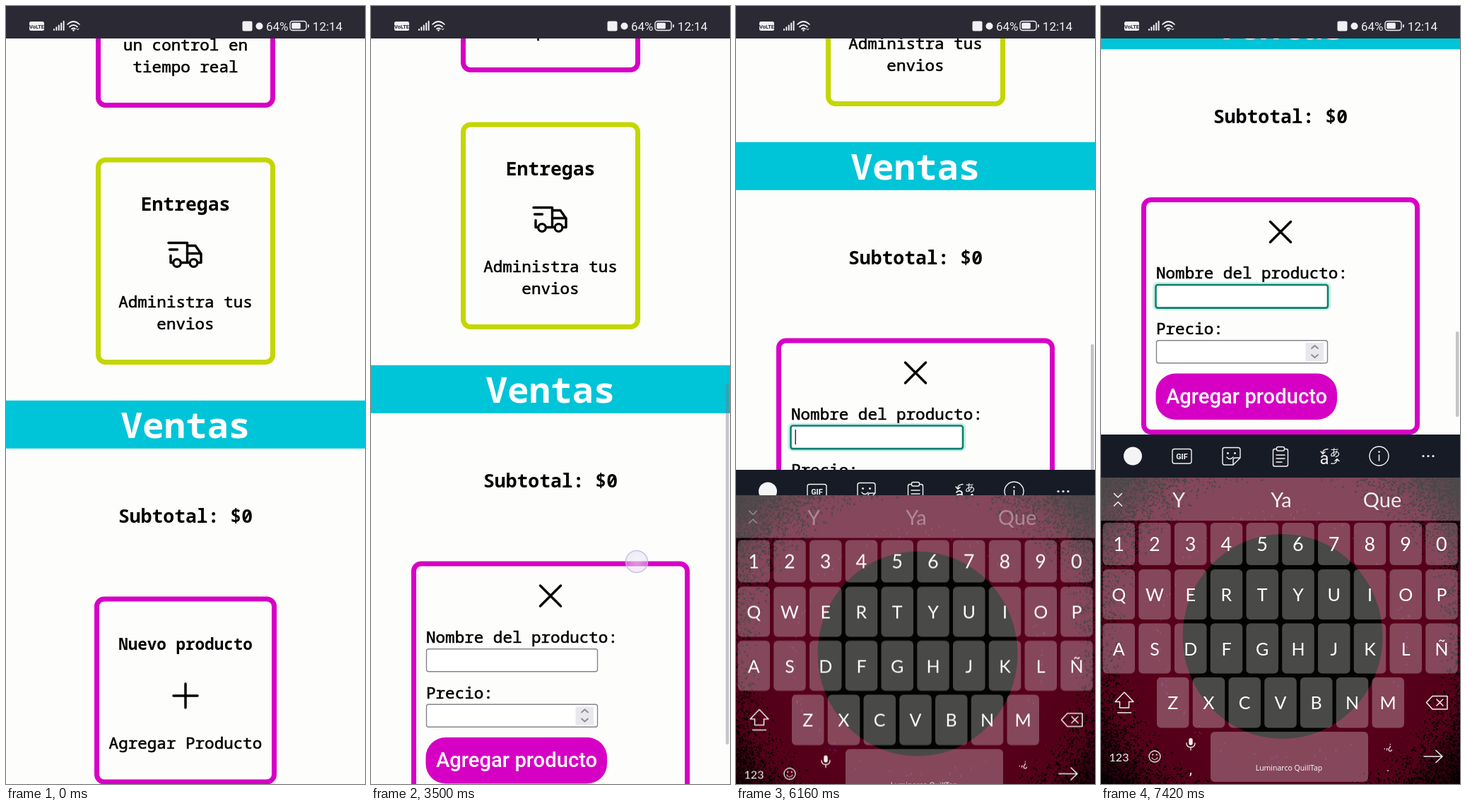
Animation of 508x1102 px, one loop 8 s. Source, as an HTML page with a canvas:

```html
<!DOCTYPE html>
<html lang="es">
<head>
<meta charset="utf-8">
<title>Ventas</title>
<style>
html, body { margin: 0; width: 100%; height: 100%; overflow: hidden; background: #fdfdfd; }
canvas { display: block; }
</style>
</head>
<body>
<canvas id="stage" width="508" height="1102"></canvas>
<script>
const W = 508, H = 1102, LOOP = 8000, BAR = 46;
const KEYS_TOP = 668, TOOLS_TOP = 607;
const MAGENTA = '#d600c4', LIME = '#c4d600', CYAN = '#00c4d8', PAPER = '#fdfdfc';
const MONO = '"Roboto Mono", "Noto Sans Mono", monospace';
const SANS = 'Roboto, sans-serif';
const ROUND = 'Lato, sans-serif';
const stage = document.getElementById('stage').getContext('2d');
let c = stage;

const clamp = (v, lo = 0, hi = 1) => Math.min(hi, Math.max(lo, v));
const linear = u => u;
const smooth = u => u * u * (3 - 2 * u);

// Value at time t along [time, value] points.
function track(t, points, ease = linear) {
  if (t <= points[0][0]) return points[0][1];
  for (let i = 1; i < points.length; i++) {
    const [t0, a] = points[i - 1], [t1, b] = points[i];
    if (t < t1) return a + (b - a) * ease((t - t0) / (t1 - t0));
  }
  return points[points.length - 1][1];
}

function text(str, x, y, font, color = '#000', align = 'center') {
  c.font = font;
  c.fillStyle = color;
  c.textAlign = align;
  c.fillText(str, x, y);
}

// Page copy; a hairline outline gives it a medium weight.
function copy(str, x, y, align) {
  text(str, x, y, '22.58px ' + MONO, '#000', align);
  c.strokeStyle = '#000';
  c.lineWidth = 0.6;
  c.strokeText(str, x, y);
}

function box(x, y, w, h, r, fill, stroke, width) {
  c.beginPath();
  c.roundRect(x, y, w, h, r);
  if (fill) { c.fillStyle = fill; c.fill(); }
  if (stroke) { c.strokeStyle = stroke; c.lineWidth = width; c.stroke(); }
}

function path(d, color, width) {
  c.lineCap = c.lineJoin = 'round';
  c.strokeStyle = color;
  c.lineWidth = width;
  c.stroke(new Path2D(d));
}

function disc(x, y, r, fill, stroke, width) {
  c.beginPath();
  c.arc(x, y, r, 0, 7);
  if (fill) { c.fillStyle = fill; c.fill(); }
  if (stroke) { c.strokeStyle = stroke; c.lineWidth = width; c.stroke(); }
}

function card(x, y, w, h, color) {
  box(x + 3.5, y + 3.5, w - 7, h - 7, 10.5, null, color, 7);
}

function statusBar() {
  const ink = '#f1f0f4';
  c.fillStyle = '#2b2934';
  c.fillRect(0, 0, W, BAR);
  box(33, 22, 21, 13, 2.5, ink);
  text('VoLTE', 43.5, 31.5, 'bold 7.5px ' + SANS, '#2b2934');
  for (let i = 0; i < 5; i++) {
    const h = 3 + i * 2.8;
    box(67 + i * 3.4, 35 - h, 2, h, 1, ink);
  }
  path('M87 26Q95.5 18 104 26M90 29.5Q95.5 24.5 101 29.5M93 32.5Q95.5 30.5 98 32.5', ink, 1.7);
  disc(95.5, 34.5, 1.3, ink);
  path('M100 32L101.5 34L103 32', ink, 1);
  box(334.5, 21.5, 14, 14, 2, ink);
  disc(358.5, 28.5, 5, ink);
  text('64%', 368, 34.5, '17px ' + SANS, ink, 'left');
  box(402, 21.5, 23, 13, 3.5, null, ink, 1.4);
  box(404.3, 23.8, 12.5, 8.4, 1.5, ink);
  box(427, 26, 1.8, 4.5, 0.9, ink);
  text('12:14', 455, 34.5, '17px ' + SANS, ink);
}

function truck() {
  path('M230 335.5H256.5V363.5M231.5 345H242.5M233 353.5V363.5H236.5' +
    'M248 363.5H259.5M256.5 339.5H268L276 351V363.5H271.5M256.5 350.5H276', '#000', 3.4);
  disc(242, 364, 5.3, null, '#000', 3.2);
  disc(265.5, 364, 5.3, null, '#000', 3.2);
}

function addCard() {
  card(125, 836.5, 258, 266, MAGENTA);
  text('Nuevo producto', 254, 911.5, 'bold 22.58px ' + MONO);
  path('M237 977H271M254 960V994', '#000', 3.5);
  copy('Agregar Producto', 254, 1051.5);
}

function form(focused, caret) {
  card(57, 836.5, 394, 336, MAGENTA);
  path('M239.5 871L268.5 900M268.5 871L239.5 900', '#000', 3.5);
  copy('Nombre del producto:', 78, 951.5, 'left');
  if (focused) {
    box(75, 958.5, 248.5, 36.5, 5, null, '#c8eee4', 3.5);
    box(77.5, 960.5, 243.5, 32.6, 3, '#fff', '#0b7f70', 2.6);
    if (caret) { c.fillStyle = '#222'; c.fillRect(83.5, 966, 1.4, 21); }
  } else {
    box(78.5, 960.8, 242, 32, 3, '#fff', '#85838c', 1.4);
  }
  copy('Precio:', 78, 1030.5, 'left');
  box(78.5, 1039.3, 242, 32, 3, '#fff', '#85838c', 1.4);
  box(289.5, 1042.5, 25.5, 26, 0, '#e9e8ed');
  path('M298 1050.5L302.5 1046.5L307 1050.5M298 1059.5L302.5 1063.5L307 1059.5', '#8b8a90', 1.8);
  box(77.5, 1086, 256.5, 65.5, 28, MAGENTA);
  text('Agregar producto', 206, 1128, '500 29.2px ' + SANS, '#fff');
}

function page(scroll, open, focused, caret) {
  const title = 'bold 26.4px ' + MONO;
  c.save();
  c.translate(0, -scroll);
  card(127, -150, 254, 294, MAGENTA);
  copy('un control en', 254, 63);
  copy('tiempo real', 254, 93.5);
  card(127, 214.5, 254, 293.5, LIME);
  text('Entregas', 254, 290, title);
  truck();
  copy('Administra tus', 254, 427);
  copy('envios', 254, 457.5);
  c.fillStyle = CYAN;
  c.fillRect(0, 558.8, W, 68);
  text('Ventas', 254, 612, 'bold 50.8px ' + MONO, '#fff');
  text('Subtotal: $0', 254, 731.5, title);
  if (open) form(focused, caret); else addCard();
  c.restore();
}

function scrollBar(y, h, alpha) {
  if (alpha > 0) box(502, y, 4.5, h, 2.2, `rgba(120,118,128,${0.42 * alpha})`);
}

function touch(x, y) {
  const g = c.createRadialGradient(x, y, 4, x, y, 16);
  g.addColorStop(0, 'rgba(238,235,246,.6)');
  g.addColorStop(1, 'rgba(222,218,238,.45)');
  disc(x, y, 15.5, g, 'rgba(190,184,232,.85)', 1.5);
}

function overscroll(alpha) {
  if (alpha <= 0) return;
  c.beginPath();
  c.ellipse(254, H + 20, 330, 36, 0, 0, 7);
  c.fillStyle = `rgba(120,120,220,${0.1 * alpha})`;
  c.fill();
}

function wallpaper() {
  const cx = 256, cy = 893;
  const g = c.createRadialGradient(cx, cy, 140, cx, cy, 340);
  g.addColorStop(0, '#58001c');
  g.addColorStop(0.6, '#54001b');
  g.addColorStop(0.95, '#0c0305');
  c.fillStyle = g;
  c.fillRect(0, KEYS_TOP, W, H - KEYS_TOP);
  let seed = 7;
  const rnd = () => (seed = seed * 16807 % 2147483647) / 2147483647;
  c.fillStyle = '#020101';
  for (let i = 0; i < 36000; i++) {
    const x = rnd() * W, y = KEYS_TOP + rnd() * (H - KEYS_TOP);
    const d = Math.hypot(x - cx, y - cy);
    const size = 1 + rnd() * 1.5;
    if (rnd() < clamp((d - 222) / 80)) c.fillRect(x, y, size, size);
  }
  c.fillStyle = 'rgba(140,40,150,.5)';
  for (let i = 0; i < 90; i++) {
    const a = rnd() * 6.283, r = 168 + rnd() * 16;
    c.fillRect(cx + r * Math.cos(a), cy + r * Math.sin(a), 1.5, 1.5 + rnd() * 2);
  }
  c.beginPath();
  c.ellipse(257, cy, 141.5, 145, 0, 0, 7);
  c.fillStyle = '#030302';
  c.fill();
}

function keyRow(chars, x, y, h, size) {
  [...chars].forEach((ch, i) => {
    const left = x + i * 50.75;
    box(left, y, 45.5, h, 6, 'rgba(255,255,255,.28)');
    text(ch, left + 22.7, y + h / 2 + size * 0.38, size + 'px ' + ROUND, '#fff');
  });
}

function keyIcons() {
  const ink = '#f2eef0';
  path('M33 972L46 985.5H39.5V994H26.5V985.5H20ZM23.5 1001H42.5', ink, 1.5);
  path('M460.5 986.5L469 977.5H490V996H469ZM475 982L484 991M484 982L475 991', ink, 1.5);
  text('123', 25.5, 1069.5, '16px ' + ROUND, ink);
  disc(76, 1063, 8, null, ink, 1.3);
  path('M72 1065Q76 1070 80 1065', ink, 1.2);
  disc(73.2, 1060.5, 1.1, ink);
  disc(78.8, 1060.5, 1.1, ink);
  box(124.3, 1037, 5.4, 10, 2.7, ink);
  path('M121 1044Q121 1050 127 1050T133 1044M127 1050V1054', ink, 1.3);
  text(',', 127, 1088, '20px ' + SANS, ink);
  text('.,¿', 406, 1053, '14px ' + SANS, ink);
  text('.', 406, 1084, '16px ' + SANS, ink);
  path('M457 1063H483M474 1054.5L483 1063L474 1071.5', ink, 1.6);
}

// The key area never changes, so it is painted once.
function paintKeys() {
  const sheet = document.createElement('canvas');
  sheet.width = W;
  sheet.height = H - KEYS_TOP;
  c = sheet.getContext('2d');
  c.translate(0, -KEYS_TOP);
  wallpaper();
  c.fillStyle = 'rgba(255,255,255,.28)';
  c.fillRect(0, KEYS_TOP, W, 61);
  keyRow('1234567890', 2.5, 732, 60, 27);
  keyRow('QWERTYUIOP', 2.5, 798, 71, 25);
  keyRow('ASDFGHJKLÑ', 2.5, 874.5, 71, 25);
  keyRow('ZXCVBNM', 79, 951, 71.5, 25);
  box(155, 1028, 223, 71, 6, 'rgba(255,255,255,.28)');
  text('Luminarco QuillTap', 266, 1083, '10.5px "Open Sans", sans-serif', '#fff');
  keyIcons();
  c = stage;
  return sheet;
}

function toolbar() {
  const ink = '#f4f4f6';
  c.fillStyle = '#171b25';
  c.fillRect(0, TOOLS_TOP, W, H - TOOLS_TOP);
  disc(45, 637.5, 13, ink);
  box(101, 627.5, 27, 20.5, 3, null, ink, 1.4);
  text('GIF', 114.5, 641.8, 'bold 11px ' + SANS, ink);
  path('M175 625.5H194Q197 625.5 197 628.5V640L187 650H175Q172 650 172 647V628.5Q172 625.5 175 625.5' +
    'M197 640H190Q187 640 187 643V650M178 639Q182 644 187 639', ink, 1.4);
  disc(179.5, 633.5, 1.4, ink);
  disc(189.5, 633.5, 1.4, ink);
  box(243.5, 627.5, 21, 24.5, 2.5, null, ink, 1.4);
  box(248.5, 624.5, 11, 5.5, 2, '#171b25', ink, 1.4);
  path('M248 636H260M248 641H260M248 646H256', ink, 1.4);
  text('a', 316, 649, '24px ' + SANS, ink);
  text('あ', 331, 638, '15px "Noto Sans CJK JP", "Noto Sans CJK", sans-serif', ink);
  path('M314 634Q313 628 321 627.5M311 631L314 634.5L317 631.5' +
    'M326 648Q334 649 334 642M331 644.5L334 641.5L337 644.5', ink, 1.4);
  disc(393.5, 637.5, 13.5, null, ink, 1.4);
  path('M393.5 636V644', ink, 1.6);
  disc(393.5, 631.5, 1.3, ink);
  for (const x of [456, 463, 470]) disc(x, 637.5, 1.6, ink);
}

function suggestions(alpha) {
  const font = '29px ' + ROUND, ink = '#f2eef0';
  c.globalAlpha = alpha;
  path('M18.5 690.5L24 696L29.5 690.5M18.5 708L24 702.5L29.5 708', ink, 1.6);
  text('Y', 110, 710, font, ink);
  text('Ya', 255, 710, font, ink);
  text('Que', 398, 710, font, ink);
  c.globalAlpha = 1;
}

const keys = paintKeys();

function keyboard(t) {
  const drop = track(t, [[5900, 495], [6000, 250], [6160, 24.5], [6300, 0]]);
  if (drop >= 495) return;
  c.save();
  c.translate(0, drop * 2.04);
  toolbar();
  c.restore();
  c.save();
  c.translate(0, drop);
  c.drawImage(keys, 0, KEYS_TOP);
  suggestions(track(t, [[6040, 0], [6160, 0.4], [6300, 1]]));
  c.restore();
}

function scrollAt(t) {
  if (t < 5900) return track(t, [[3200, 0], [3500, 50], [3660, 70.5]]);
  if (t < 6580) return track(t, [[5940, 70.5], [6160, 366], [6300, 414], [6580, 436]]);
  return track(t, [[6580, 436], [7400, 565.5]], smooth);
}

function bars(t, scroll) {
  if (t < 5900) {
    const alpha = t < 3000
      ? track(t, [[1540, 0], [1580, 1], [1800, 1], [2100, 0]])
      : track(t, [[3040, 0], [3080, 1], [4860, 1], [5320, 0]]);
    scrollBar(506 + scroll * 0.58, 511, alpha);
  } else if (t < 6240) {
    scrollBar(479, 240, track(t, [[5960, 0], [6060, 1]]));
  } else {
    scrollBar(423 + (scroll - 436) * 0.293, 121, 1);
  }
}

function touches(t) {
  if (t >= 1380 && t < 1540) touch(255.5, 961);
  if (t >= 3040 && t < 4400) {
    touch(track(t, [[3200, 367], [3500, 376], [4300, 386]]),
      track(t, [[3200, 840], [3500, 787], [4300, 690]]));
  }
  if (t >= 5560 && t < 5680) touch(196, 906);
}

function draw(now) {
  const t = now % LOOP, scroll = scrollAt(t);
  c.fillStyle = PAPER;
  c.fillRect(0, 0, W, H);
  page(scroll, t >= 1560, t >= 5680, t < 7400);
  overscroll(track(t, [[3660, 0], [4200, 1], [4500, 1], [4800, 0.3], [5000, 0]]));
  bars(t, scroll);
  touches(t);
  keyboard(t);
  statusBar();
}

let start;
function tick(now) {
  start ??= now;
  draw(now - start);
  requestAnimationFrame(tick);
}
requestAnimationFrame(tick);
</script>
</body>
</html>
```
